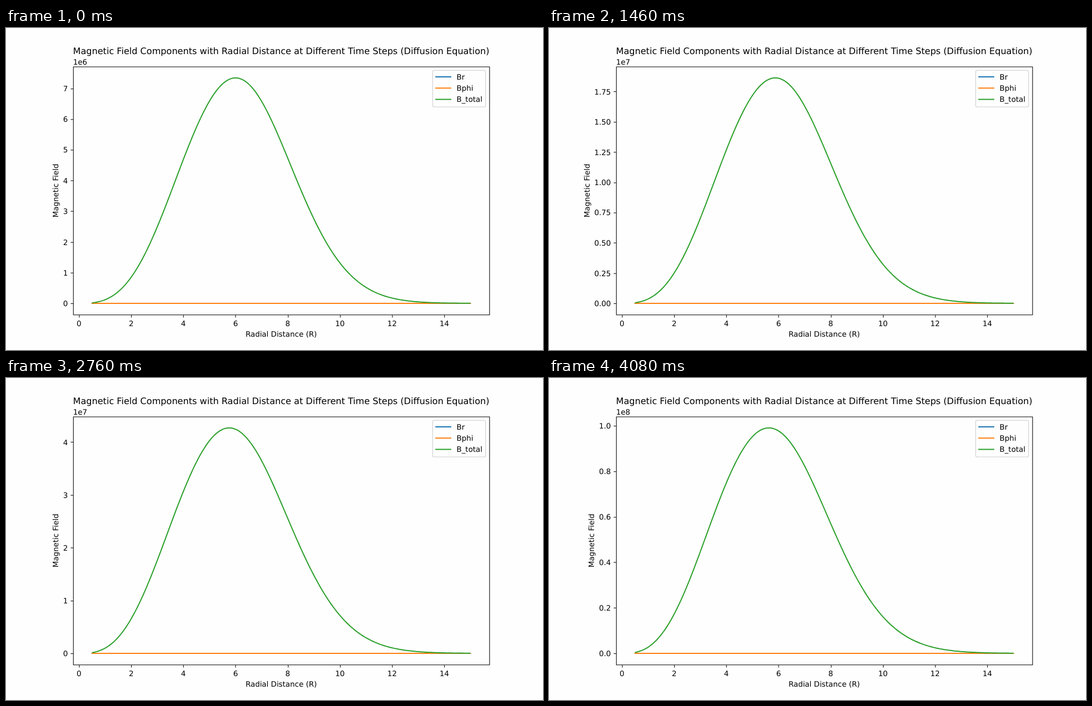
Animation of 966x580 px, one loop 4100 ms. Source, as an HTML page:

```html
<!DOCTYPE html>
<html>
<head>
<meta charset="utf-8">
<style>
html, body { margin: 0; width: 100%; height: 100%; overflow: hidden; background: #fefefe; }
svg { display: block; }
text { font: 13.889px "DejaVu Sans", Verdana, sans-serif; text-rendering: geometricPrecision; }
</style>
</head>
<body>
<svg id="stage" width="966" height="580" viewBox="0 0 1000 600" preserveAspectRatio="none"></svg>
<script>
const stage = document.getElementById('stage');
const LOOP = 4100, STEP_MS = 20;
const LEFT = 125, RIGHT = 900, ZERO = 513, PEAK = 420;
const UNIT = (RIGHT - LEFT) / 1.1 / 14.5;
const COLORS = ['#1f77b4', '#ff7f0e', '#2ca02c'];

const px = r => LEFT + (RIGHT - LEFT) / 22 + (r - 0.5) * UNIT;
const snap = v => Math.floor(v + 0.5) + 0.5;

const text = (x, y, s, anchor = 'middle', extra = '') =>
  `<text x="${x}" y="${y}" text-anchor="${anchor}" ${extra}>${s}</text>`;
const path = (d, color = '#000', width = 1.1) =>
  `<path d="${d}" fill="none" stroke="${color}" stroke-width="${width}" stroke-linejoin="${width > 2 ? 'round' : 'miter'}"/>`;
const curve = (d, color) => path(d, color, 2.083);

// Skewed bell around r = 6 that drifts inwards as s goes from 0 to 1.
function field(r, s) {
  const u = r - 6, x = r / 6, v = x - 1;
  const bell = -u * u * (0.1088 + 0.0105 * Math.tanh(u / 2)) + 2.75 * (Math.log(x) - v + v * v / 2);
  return Math.exp(bell + s * u * (-0.073 + 0.0105 * u + 0.0006 * u * u));
}

// Smallest round step that gives at most nine intervals.
function tickStep(range) {
  const raw = range / 9, base = 10 ** Math.floor(Math.log10(raw));
  return [1, 2, 2.5, 5, 10].find(m => m * base >= raw) * base;
}

function curvePath(s) {
  const pts = [];
  for (let i = 0; i <= 290; i++) pts.push([0.5 + i * 0.05, field(0.5 + i * 0.05, s)]);
  const max = Math.max(...pts.map(p => p[1]));
  return 'M' + pts.map(([r, f]) => `${px(r).toFixed(2)} ${(ZERO - PEAK * f / max).toFixed(2)}`).join('L');
}

function yAxis(peak) {
  const step = tickStep(1.1 * peak), top = 1.05 * peak;
  const exp = Math.floor(Math.log10(Math.ceil(top / step) * step));
  const unit = step / 10 ** exp;
  const digits = [0, 1, 2].find(d => Math.abs(unit * 10 ** d - Math.round(unit * 10 ** d)) < 1e-6);
  let out = text(125, 68, '1e' + exp, 'start');
  for (let i = 0; i * step <= top; i++) {
    const y = ZERO - PEAK * i * step / peak;
    out += path(`M120.5 ${snap(y)}H125`) + text(115.3, Math.round(y + 5.3), (i * unit).toFixed(digits), 'end');
  }
  const labelWidth = 8.84 + (digits && 4.41 + digits * 8.84);
  return out + text(0, 0, 'Magnetic Field', 'middle',
    `transform="translate(${(106 - labelWidth).toFixed(1)} 303) rotate(-90)"`);
}

function frame() {
  let out = text(512.5, 48.5, 'Magnetic Field Components with Radial Distance at Different Time Steps (Diffusion Equation)',
    'middle', 'style="font-size:16.667px"');
  for (let r = 0; r <= 14; r += 2) {
    out += path(`M${snap(px(r))} 535V539.5`) + text(px(r).toFixed(1), 555, r);
  }
  return out + text(512.5, 575, 'Radial Distance (R)') + path('M125.5 72.5H900.5V534.5H125.5Z');
}

const legend =
  '<rect x="794.5" y="79" width="98.5" height="68" rx="2.8" fill="#fefefe" fill-opacity=".8" stroke="#ccc" stroke-opacity=".8" stroke-width="1.39"/>' +
  ['Br', 'Bphi', 'B_total'].map((name, i) =>
    path(`M799.4 ${91 + i * 21}h29.8`, COLORS[i], 2.083) + text(839, 96 + i * 21, name, 'start')).join('');

const flat = COLORS.slice(0, 2).map(c => curve(`M${px(0.5) - 1} ${ZERO}H${px(15) + 1}`, c)).join('');
const still = frame();

function draw() {
  const k = Math.floor(performance.now() % LOOP / STEP_MS);
  const peak = 7.343e6 * Math.exp(0.012754 * k);
  stage.innerHTML = flat + curve(curvePath(k / 204), COLORS[2]) + still + yAxis(peak) + legend;
  requestAnimationFrame(draw);
}
draw();
</script>
</body>
</html>
```
